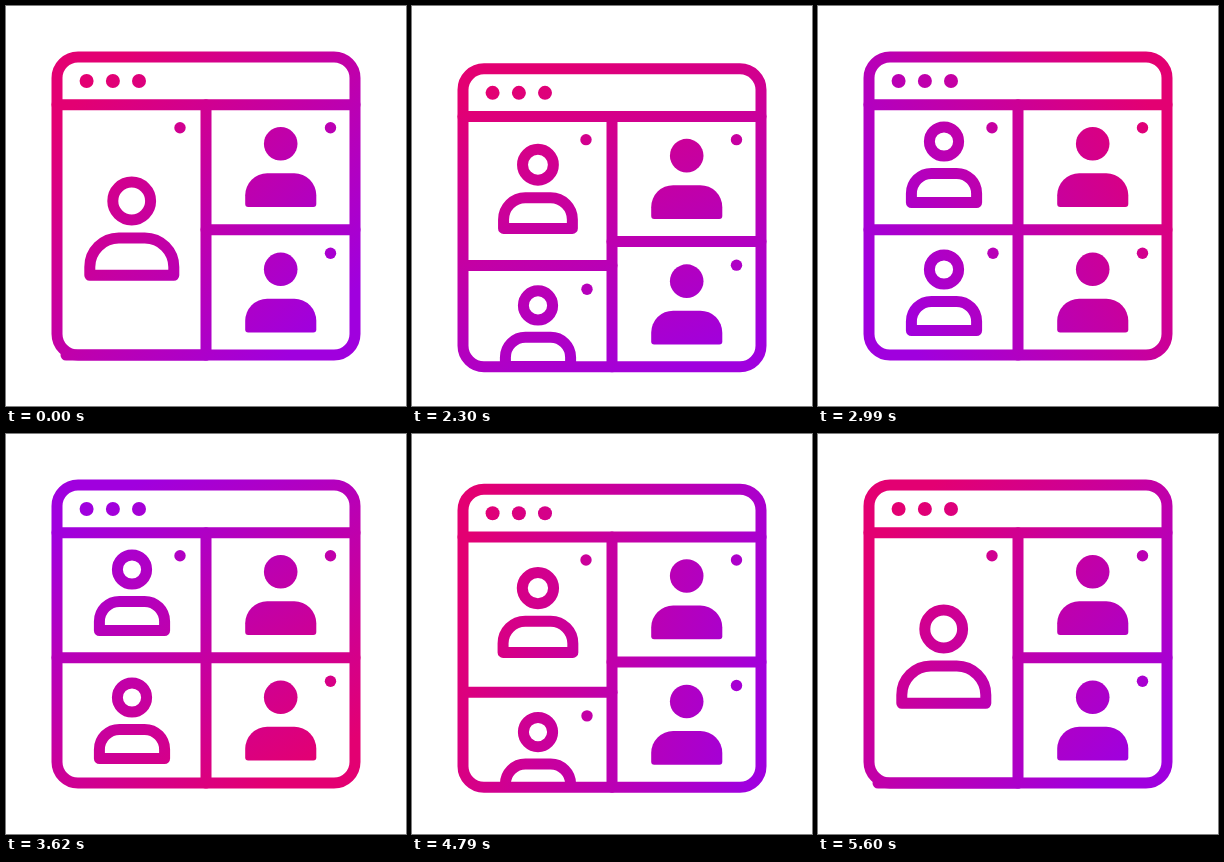
An HTML page with a canvas that plays this animation: 400x400 px, repeating every 5.63 s.

```html
<!DOCTYPE html>
<html lang="en">
<head>
<meta charset="utf-8">
<title>Video call layout</title>
<style>
html, body { margin: 0; width: 100%; height: 100%; overflow: hidden; background: #fff; }
canvas { display: block; width: 100vmin; height: 100vmin; }
</style>
</head>
<body>
<canvas id="stage"></canvas>
<script>
const LOOP = 5630, START = 2000, STEP = 30, LINE = 11;
const canvas = document.getElementById('stage');
const ctx = canvas.getContext('2d');
const ratio = window.devicePixelRatio || 1;
canvas.width = canvas.height = 400 * ratio;

const mix = (a, b, p) => a + (b - a) * p;
const span = (t, a, b) => Math.min(1, Math.max(0, (t - a) / (b - a)));
const inOut = x => (1 - Math.cos(Math.PI * x)) / 2;
const quickStart = x => (inOut(x) + Math.sin(x * Math.PI / 2)) / 2;

// Interpolates a list of [time, value] pairs.
function keyed(t, keys, ease = x => x) {
  let value = keys[0][1];
  for (let i = 1; i < keys.length; i++) {
    const [t0, v0] = keys[i - 1], [t1, v1] = keys[i];
    if (t >= t0) value = mix(v0, v1, ease(span(t, t0, t1)));
  }
  return value;
}

const dipAt = t => keyed(t, [
  [2000, 0], [2200, 13], [2723, 0], [4190, 0], [4380, 8], [4690, 0], [4950, 13], [5400, 0]
], inOut);

const turnAt = t => keyed(t, [
  [2000, 0], [2600, 45], [3620, 195], [4190, 282], [5060, 350], [5420, 360]
]) * Math.PI / 180;

// 1: one tall left panel, 0: two stacked panels.
const mergeAt = t => t < 3500
  ? 1 - quickStart(span(t, 2000, 2450))
  : inOut(span(t, 4600, 5180));

function paint(turn) {
  const a = turn + Math.PI / 4, dx = Math.cos(a) * 165, dy = Math.sin(a) * 165;
  const g = ctx.createLinearGradient(200 - dx, 200 - dy, 200 + dx, 200 + dy);
  g.addColorStop(0, '#e30072');
  g.addColorStop(1, '#a000de');
  ctx.fillStyle = ctx.strokeStyle = g;
}

function line(x0, y0, x1, y1) {
  ctx.beginPath();
  ctx.moveTo(x0, y0);
  ctx.lineTo(x1, y1);
  ctx.stroke();
}

function disc(x, y, r, outline) {
  ctx.beginPath();
  ctx.arc(x, y, r, 0, Math.PI * 2);
  outline ? ctx.stroke() : ctx.fill();
}

function shoulders(x0, y0, x1, y1, top, bottom) {
  ctx.beginPath();
  ctx.roundRect(x0, y0, x1 - x0, y1 - y0, [top, top, bottom, bottom]);
}

function filledPerson(y) {
  disc(274.7, y, 16.8);
  shoulders(239.2, y + 29.5, 310.3, y + 63.3, 22, 3);
  ctx.fill();
}

function outlinePerson(p, shift = 0) {
  disc(mix(126, 125.7, p), mix(135.5, 195, p) + shift, mix(14.6, 18.9, p), true);
  shoulders(mix(93.4, 83.8, p), mix(167.4, 232, p) + shift,
    mix(158.6, 167.8, p), mix(196.6, 269.3, p) + shift, mix(20, 29, p), 0);
  ctx.stroke();
}

function draw(t) {
  const merge = mergeAt(t), barY = mix(223.7, 349, merge);
  ctx.setTransform(ratio, 0, 0, ratio, 0, 0);
  ctx.fillStyle = '#fff';
  ctx.fillRect(0, 0, 400, 400);
  ctx.translate(0, dipAt(t));
  ctx.lineWidth = LINE;
  ctx.lineCap = ctx.lineJoin = 'round';
  paint(turnAt(t));

  ctx.beginPath();
  ctx.roundRect(51, 51, 298, 298, 21);
  ctx.stroke();
  line(51, 98.7, 349, 98.7);
  line(200, 98.7, 200, 349);
  line(200, 223.7, 349, 223.7);
  line(mix(51, 60, merge), barY, 200, barY);

  for (const x of [80.6, 106.9, 133]) disc(x, 75, 7);
  for (const [x, y] of [[174, 121.8], [324.5, 121.8], [324.5, 247.3]]) disc(x, y, 5.7);

  filledPerson(137.8);
  filledPerson(263.3);
  outlinePerson(merge);

  // The lower caller travels with the bar, hidden past the window edge.
  if (merge < 1) {
    ctx.save();
    ctx.beginPath();
    ctx.rect(51, barY, 149, 349 - barY);
    ctx.clip();
    const shift = barY - 223.7;
    outlinePerson(0, 128 + shift);
    if (t < 3440 || t >= 3800) disc(175, 247.3 + shift, 5.7);
    ctx.restore();
  }
}

const origin = performance.now();
function tick() {
  const t = Math.max(0, performance.now() - origin) % LOOP;
  draw(t < START + STEP ? 0 : START + Math.floor((t - START) / STEP) * STEP);
  requestAnimationFrame(tick);
}
tick();
</script>
</body>
</html>
```
